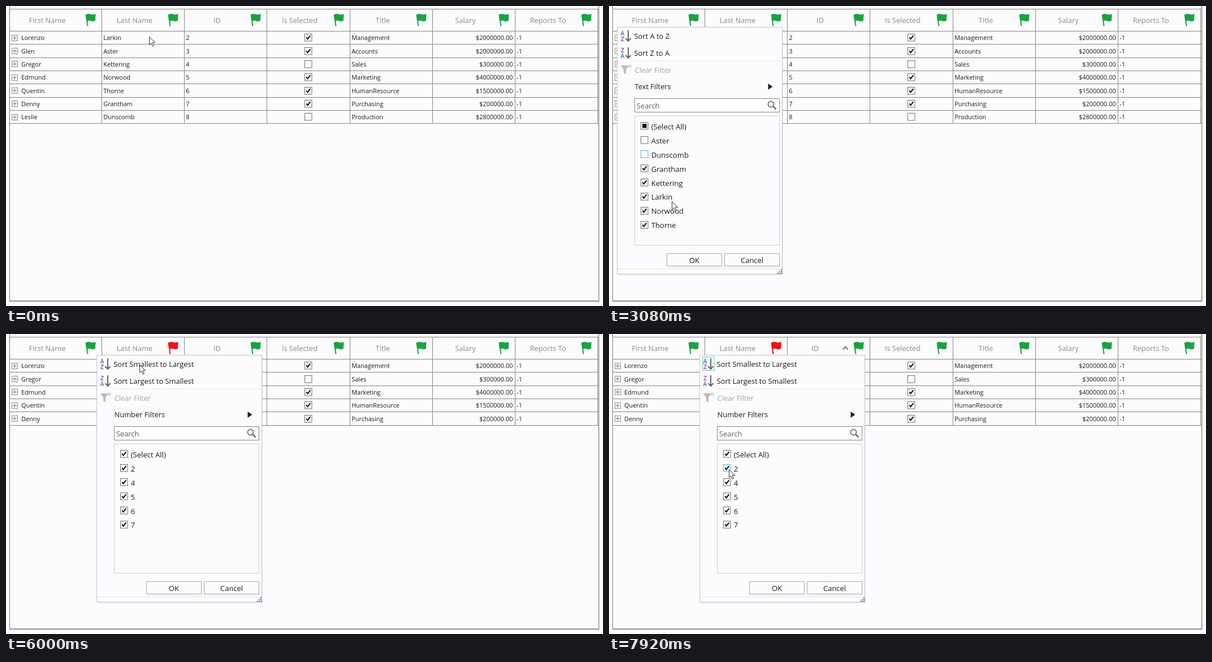
Write an HTML page with a canvas that moves like this. It is 1056x530 px and loops after 8000 ms.

```html
<!DOCTYPE html>
<html lang="en">
<head>
<meta charset="utf-8">
<title>Grid filter</title>
<style>
html, body { margin: 0; width: 100%; height: 100%; overflow: hidden; background: #fdfdfc; }
canvas { display: block; }
</style>
</head>
<body>
<canvas id="stage" width="1056" height="530"></canvas>
<script>
const ctx = document.getElementById('stage').getContext('2d');
const LOOP = 8000, COL = 146.24, ROW = 23.33;
const INK = '#1c1c1c', LINE = '#85857f', GRAY = '#777', BG = '#fcfcfe';
const GREEN = '#1aa342', RED = '#f01414', BLUE = '#3c80b4', PURPLE = '#86429c';

const heads = ['First Name', 'Last Name', 'ID', 'Is Selected', 'Title', 'Salary', 'Reports To'];
const people = [
  ['Lorenzo', 'Larkin', 2, true, 'Management', '$2000000.00', -1],
  ['Glen', 'Aster', 3, true, 'Accounts', '$2000000.00', -1],
  ['Gregor', 'Kettering', 4, false, 'Sales', '$300000.00', -1],
  ['Edmund', 'Norwood', 5, true, 'Marketing', '$4000000.00', -1],
  ['Quentin', 'Thorne', 6, true, 'HumanResource', '$1500000.00', -1],
  ['Denny', 'Grantham', 7, true, 'Purchasing', '$200000.00', -1],
  ['Leslie', 'Dunscomb', 8, false, 'Production', '$2800000.00', -1]
];
const lastNames = people.map(p => p[1]).sort();
const kept = people.filter(p => lastNames.indexOf(p[1]) > 1);
const ids = kept.map(p => p[2]);
const textMenu = ['Sort A to Z', 'Sort Z to A', 'Text Filters'];
const numberMenu = ['Sort Smallest to Largest', 'Sort Largest to Smallest', 'Number Filters'];

// pointer moves: start time, end time, x, y
const moves = [
  [40, 700, 293, 26],
  [1380, 2210, 67, 240],
  [2560, 2700, 66, 265],
  [2850, 3080, 111, 345],
  [3080, 3310, 150, 449],
  [3560, 4150, 381, 90],
  [4150, 4700, 446, 22],
  [5400, 5950, 236, 54],
  [6130, 6700, 441, 29],
  [7100, 7900, 212, 239]
];

const colX = i => Math.round(169 + COL * (i - 1));

function rect(x, y, w, h, color) {
  ctx.fillStyle = color;
  ctx.fillRect(x, y, w, h);
}

function frame(x, y, w, h, color, fill) {
  rect(x, y, w, h, fill);
  ctx.strokeStyle = color;
  ctx.lineWidth = 1;
  ctx.strokeRect(x + .5, y + .5, w - 1, h - 1);
}

function text(s, x, mid, size, color = INK, align = 'left', weight = 400) {
  ctx.font = `${weight} ${size}px "Open Sans", "Noto Sans", sans-serif`;
  ctx.textAlign = align;
  ctx.fillStyle = color;
  ctx.fillText(s, x, mid + size * .36);
}

function line(points, color, width = 2) {
  ctx.beginPath();
  points.forEach(p => ctx.lineTo(...p));
  ctx.strokeStyle = color;
  ctx.lineWidth = width;
  ctx.stroke();
}

function poly(points, fill) {
  ctx.beginPath();
  points.forEach(p => ctx.lineTo(...p));
  ctx.closePath();
  ctx.fillStyle = fill;
  ctx.fill();
}

function ring(x, y, r, color, width) {
  ctx.beginPath();
  ctx.arc(x, y, r, 0, 2 * Math.PI);
  ctx.strokeStyle = color;
  ctx.lineWidth = width;
  ctx.stroke();
}

// state: true, false or 'some'
function checkbox(cx, cy, state, border = '#6c6c6c') {
  const x = Math.floor(cx - 6.5), y = Math.floor(cy - 6.5);
  frame(x, y, 13.5, 13.5, border, '#fff');
  if (state === 'some') rect(x + 3, y + 3, 7.5, 7.5, '#111');
  else if (state) line([[x + 3.2, y + 6.5], [x + 5.6, y + 9.4], [x + 10.4, y + 3.2]], '#111');
}

function flag(x, color) {
  const top = [], bottom = [];
  for (let u = 0; u <= 1; u += .1) {
    const y = 15.5 - 2 * u - 1.2 * Math.sin(2 * Math.PI * u);
    top.push([x + 1 + 17.5 * u, y]);
    bottom.unshift([x + 3 + 15 * u, y + 12]);
  }
  poly(top.concat(bottom), color);
  line([[x + 1.5, 15.5], [x + 4.5, 35.5]], color);
}

function header(name, i, color, sorted) {
  const right = colX(i + 1);
  const mid = (i ? colX(i) : 14.5) + (sorted ? 49.5 : 58.5);
  text(name, mid, 25, 12.8, '#8b8b8b', 'center');
  if (sorted) line([[-4.5, 2.5], [0, -2.5], [4.5, 2.5]].map(p => [right - 43 + p[0], 25 + p[1]]), GRAY);
  flag(right - 29, color);
}

function cell(value, i, y) {
  if (i === 3) checkbox(534.8, y, value);
  else if (i === 5) text(value, colX(6) - 3.5, y, 10.95, INK, 'right');
  else text(value, i ? colX(i) + 3.2 : 27, y, 10.95);
}

function grid(rows, filtered, sorted) {
  rect(0, 0, 1056, 530, '#fdfdfc');
  rect(6, 0, 1045, 524, '#ededea');
  rect(6, 0, 1043, 522, GRAY);
  rect(7, 0, 1041, 520.5, BG);
  rect(6, 5, 1043, 1, LINE);

  const bottom = Math.round(44 + ROW * rows.length);
  for (let i = 0; i <= rows.length; i++) rect(7, Math.round(44 + ROW * i), 1041, 1, LINE);
  heads.forEach((name, i) => {
    rect(colX(i + 1), 5, 1, bottom - 5, LINE);
    header(name, i, filtered && i === 1 ? RED : GREEN, sorted && i === 2);
  });
  rows.forEach((person, i) => {
    const y = 56.4 + ROW * i, top = Math.round(y - 5.7);
    frame(10, top, 11, 11, '#8c8c8c', '#fff');
    rect(12, top + 5, 7, 1, GRAY);
    rect(15, top + 2, 1, 7, GRAY);
    person.forEach((value, j) => cell(value, j, y));
  });
}

function sortItem(label, y, letters, colors) {
  letters.forEach((c, i) => text(c, 24, y - 5 + i * 10.5, 10.5, colors[i], 'center', 600));
  line([[34, y - 10], [34, y + 8]], '#666');
  line([[29.5, y + 4], [34, y + 9], [38.5, y + 4]], '#666');
  text(label, 44.5, y, 12.9);
}

function button(x, label) {
  frame(x, 437, 98, 23, '#a9a9a5', '#fcfcfa');
  text(label, x + 49, 449, 12.9, INK, 'center');
}

function popup(shift, [up, down, filters], items, stateOf, focus, marked) {
  ctx.save();
  ctx.translate(shift, 0);
  rect(16, 38, 292, 438, 'rgba(60,60,80,.08)');
  frame(14, 37, 293, 437, '#c3c3d4', BG);

  if (marked) frame(19, 40, 22, 25, '#86c5a8', '#f3faf6');
  sortItem(up, 53, ['A', 'Z'], [BLUE, PURPLE]);
  sortItem(down, 83, ['Z', 'A'], [PURPLE, BLUE]);
  rect(44, 97, 262, 1, '#e9e9ee');

  poly([[20.5, 105], [35.5, 105], [30, 112], [30, 121], [26, 118], [26, 112]], '#bcbcbc');
  ring(37, 106, 2, '#bbb', 1.2);
  text('Clear Filter', 45.5, 113, 12.9, '#a3a3a3');
  text(filters, 45.5, 142, 12.9);
  poly([[281.5, 137], [289.5, 142.5], [281.5, 148]], '#222');

  frame(45, 163, 257, 25, '#85858c', '#fff');
  text('Search', 49, 176, 12.8, '#5c5c5c');
  ring(286.5, 173.5, 5, GRAY, 2);
  line([[290, 177], [295.5, 182.5]], GRAY, 2.8);

  frame(45, 194, 257, 229, '#cfcfc4', BG);
  ['(Select All)', ...items].forEach((label, i) => {
    const y = 213 + 24.95 * i;
    checkbox(63.3, y - 1, stateOf(i), i === focus ? '#5fa9dc' : undefined);
    text(label, 74.7, y, 13.1);
  });

  button(102, 'OK');
  button(204, 'Cancel');
  rect(15, 464, 291, 1, '#e1e1f0');
  for (let i = 0; i < 3; i++)
    for (let j = 0; j <= i; j++) rect(304 - j * 3, 465 + i * 3, 2, 2, GRAY);
  ctx.restore();
}

function pointer(t) {
  let x = 253.5, y = 54.5;
  for (const [from, to, mx, my] of moves) {
    const u = Math.min(1, Math.max(0, (t - from) / (to - from)));
    const ease = u * u * (3 - 2 * u);
    x += (mx + .5 - x) * ease;
    y += (my + .5 - y) * ease;
  }
  const shape = [[0, 0], [0, 14], [3.2, 11], [5.8, 16.5], [8, 15.5], [5.6, 10.2], [10, 10]]
    .map(([dx, dy]) => [x + dx, y + dy]);
  poly(shape, '#fff');
  line([...shape, shape[0]], '#333', 1);
}

function draw(t) {
  const filtered = t >= 3540, sorted = t >= 6080;
  grid(filtered ? kept : people, filtered, sorted);
  if (t >= 1230 && !filtered) {
    const cleared = t < 2380 ? 0 : t < 2770 ? 1 : 2;
    const focus = t < 2200 ? -1 : t < 2690 ? 1 : 2;
    popup(0, textMenu, lastNames, i => i ? i > cleared : cleared ? 'some' : true, focus, false);
  } else if ((t >= 5230 && !sorted) || t >= 7000) {
    popup(146, numberMenu, ids, () => true, t < 7850 ? -1 : 1, sorted);
  }
  pointer(t);
}

const start = performance.now();
function tick() {
  draw((performance.now() - start) % LOOP);
  requestAnimationFrame(tick);
}
tick();
</script>
</body>
</html>
```
